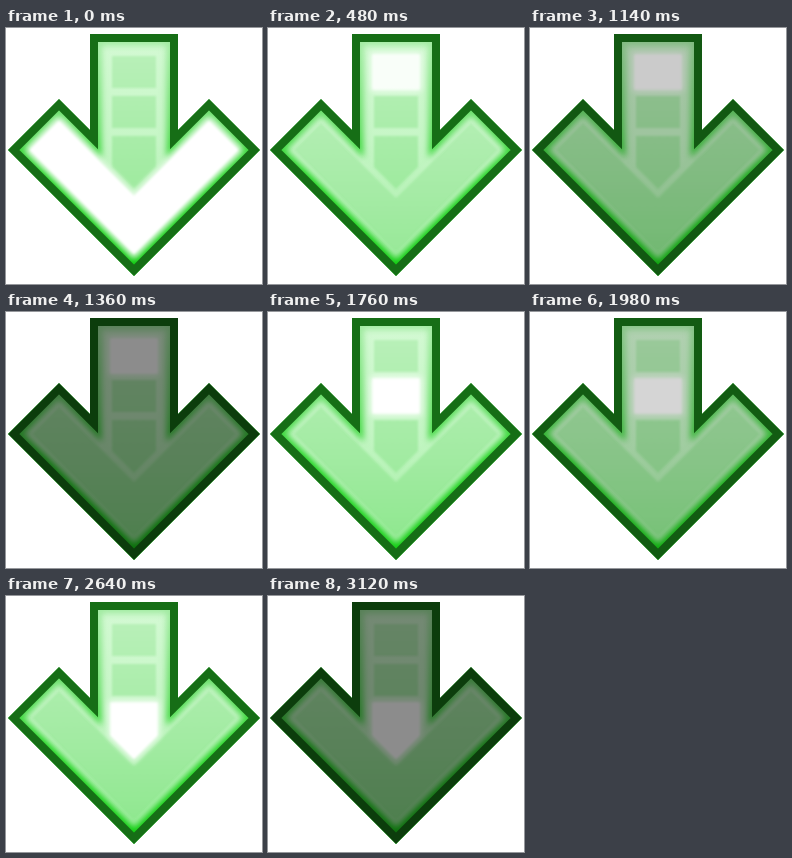
Animation, 256 px wide and 256 px high, one loop 3520 ms. Source, as an HTML page:

```html
<!DOCTYPE html>
<html lang="en">
<head>
<meta charset="utf-8">
<title>Download arrow</title>
<style>
  html, body { margin: 0; width: 100%; height: 100%; overflow: hidden; background: #fff; }
  svg { display: block; width: 100vw; height: 100vh; }
</style>
</head>
<body>
<svg viewBox="0 0 256 256">
  <defs>
    <path id="arrow" d="M84 6H172V102L203 71L254 122L128 248L2 122L53 71L84 102Z"/>
    <path id="top" d="M106 28H150V60H106Z"/>
    <path id="middle" d="M106 68H150V100H106Z"/>
    <path id="point" d="M106 108H150V139L128 161L106 139Z"/>
    <path id="chevron" d="M53 95L128 170L203 95L230 122L128 224L26 122Z"/>
    <clipPath id="inside"><use href="#arrow"/></clipPath>
    <filter id="soft" filterUnits="userSpaceOnUse" x="-20" y="-20" width="296" height="296" color-interpolation-filters="sRGB">
      <feGaussianBlur stdDeviation="3.2"/>
    </filter>
    <filter id="edge" filterUnits="userSpaceOnUse" x="0" y="0" width="256" height="256" color-interpolation-filters="sRGB">
      <feGaussianBlur stdDeviation=".8"/>
    </filter>
    <linearGradient id="body" gradientUnits="userSpaceOnUse" x1="0" y1="14" x2="0" y2="236">
      <stop stop-color="#d4fad4"/>
      <stop offset=".45" stop-color="#c6f6c6"/>
      <stop offset="1" stop-color="#a0eea0"/>
    </linearGradient>
    <linearGradient id="panel" gradientUnits="userSpaceOnUse" x1="0" y1="28" x2="0" y2="225">
      <stop stop-color="#b8f0b8"/>
      <stop offset=".6" stop-color="#a2eba2"/>
      <stop offset="1" stop-color="#90e890"/>
    </linearGradient>
    <linearGradient id="rim" gradientUnits="userSpaceOnUse" x1="0" y1="14" x2="0" y2="236">
      <stop stop-color="#a0eaa0"/>
      <stop offset=".38" stop-color="#60dc60"/>
      <stop offset=".6" stop-color="#20d420"/>
      <stop offset="1" stop-color="#10cc10"/>
    </linearGradient>
  </defs>
  <g clip-path="url(#inside)">
    <use href="#arrow" fill="url(#body)"/>
    <g fill="url(#panel)" filter="url(#edge)">
      <use href="#top"/><use href="#middle"/><use href="#point"/><use href="#chevron"/>
    </g>
    <use href="#arrow" fill="none" stroke="url(#rim)" stroke-width="23" filter="url(#soft)"/>
    <g id="lights" fill="#fff" stroke="#fff"></g>
    <use href="#arrow" fill="none" stroke="#166e16" stroke-width="16"/>
    <use id="shade" href="#arrow" opacity="0"/>
  </g>
</svg>
<script>
const PART = 880, HOLD = 100, STEP = 38, STEPS = 11;
const shade = document.getElementById('shade');
const box = document.getElementById('lights');

// Each light is a crisp white shape over a blurred halo.
const lights = ['chevron', 'top', 'middle', 'point'].map(name => {
  const g = document.createElementNS('http://www.w3.org/2000/svg', 'g');
  g.innerHTML = `<use href="#${name}" stroke-width="7" opacity=".75" filter="url(#soft)"/>
    <use href="#${name}" stroke-width="3" filter="url(#edge)"/>`;
  return box.appendChild(g);
});

function draw(now) {
  const t = now % (PART * 4);
  const part = Math.floor(t / PART);
  const local = t % PART;
  const step = local < HOLD ? 0 : Math.min(STEPS, Math.floor((local - HOLD) / STEP) + 1);
  const level = [0, 0, 0, 0];
  level[part] = 1;
  if (part === 0) {
    level[1] = step / (STEPS + 1);
    level[0] = 1 - level[1];
  }
  lights.forEach((g, i) => g.setAttribute('opacity', level[i]));
  shade.setAttribute('opacity', part ? 0.45 * step / STEPS : 0);
}

const start = performance.now();
function tick() {
  draw(performance.now() - start);
  requestAnimationFrame(tick);
}
tick();
</script>
</body>
</html>
```
